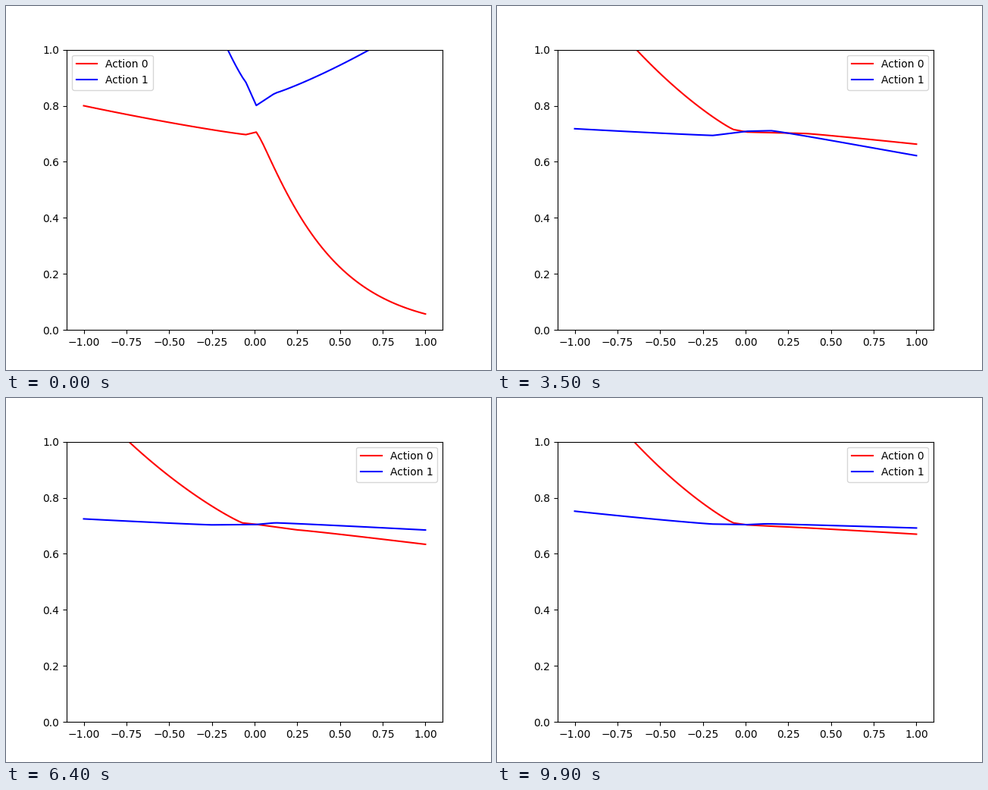
A matplotlib script that plays this animation: 640 by 480 pixels, repeating every 10000 ms.

```python
import numpy as np
import matplotlib.pyplot as plt
from matplotlib.animation import FuncAnimation

FRAMES, STEP = 100, 100
MID = .01   # x of the middle joint
BOW = 1.1   # how much the outer arms curve
x = np.linspace(-1, 1, 100)

# time in ms: left end, left knee (x, y), middle, right knee (x, y), right end
red = {
    0: (.80, -.05, .697, .706, .03, .686, .057),
    1300: (.749, -.10, .702, .718, .10, .722, .619),
    3500: (1.272, -.07, .715, .706, .35, .701, .663),
    5600: (1.166, -.07, .711, .705, .25, .687, .648),
    6500: (1.164, -.07, .710, .705, .25, .685, .632),
    8500: (1.147, -.07, .708, .703, .20, .695, .667),
    9900: (1.259, -.07, .710, .703, .20, .697, .670),
}
blue = {
    0: (3.49, -.05, .883, .801, .12, .845, 1.119),
    1100: (.375, -.20, .650, .735, .25, .660, .450),
    1300: (.488, -.20, .677, .737, .25, .681, .530),
    3500: (.718, -.19, .694, .709, .15, .711, .622),
    5600: (.733, -.24, .706, .705, .12, .711, .683),
    7300: (.715, -.26, .700, .704, .12, .710, .687),
    8500: (.721, -.24, .700, .703, .12, .708, .685),
    9900: (.752, -.19, .706, .704, .12, .707, .692),
}


def pose(keys, t):
    times = list(keys)
    i = min(np.searchsorted(times, t, side="right") - 1, len(times) - 2)
    a, b = times[i], times[i + 1]
    w = (t - a) / (b - a)
    if a < 3500:  # learning is fastest early on
        w **= .7
    return (1 - w) * np.array(keys[a]) + w * np.array(keys[b])


def arm(knee, end, u):
    """Exponential growth from the knee (u = 0) to the end (u = 1)."""
    return (end / knee) ** (np.clip(u, 0, 1) ** BOW)


def curve(keys, t):
    left, xl, yl, mid, xr, yr, right = pose(keys, t)
    core = np.interp(x, [xl, MID, xr], [yl, mid, yr])
    return (core * arm(yl, left, (xl - x) / (xl + 1))
            * arm(yr, right, (x - xr) / (1 - xr)))


fig, ax = plt.subplots(figsize=(6.4, 4.8), dpi=100)
line0, = ax.plot(x, curve(red, 0), "r", label="Action 0")
line1, = ax.plot(x, curve(blue, 0), "b", label="Action 1")
ax.set_xlim(-1.1, 1.1)
ax.set_ylim(0, 1)
ax.legend(loc="best")


def draw(i):
    line0.set_ydata(curve(red, i * STEP))
    line1.set_ydata(curve(blue, i * STEP))
    return line0, line1


anim = FuncAnimation(fig, draw, frames=FRAMES, interval=STEP,
                     init_func=lambda: draw(0), repeat=True, repeat_delay=0)
plt.show()
```
